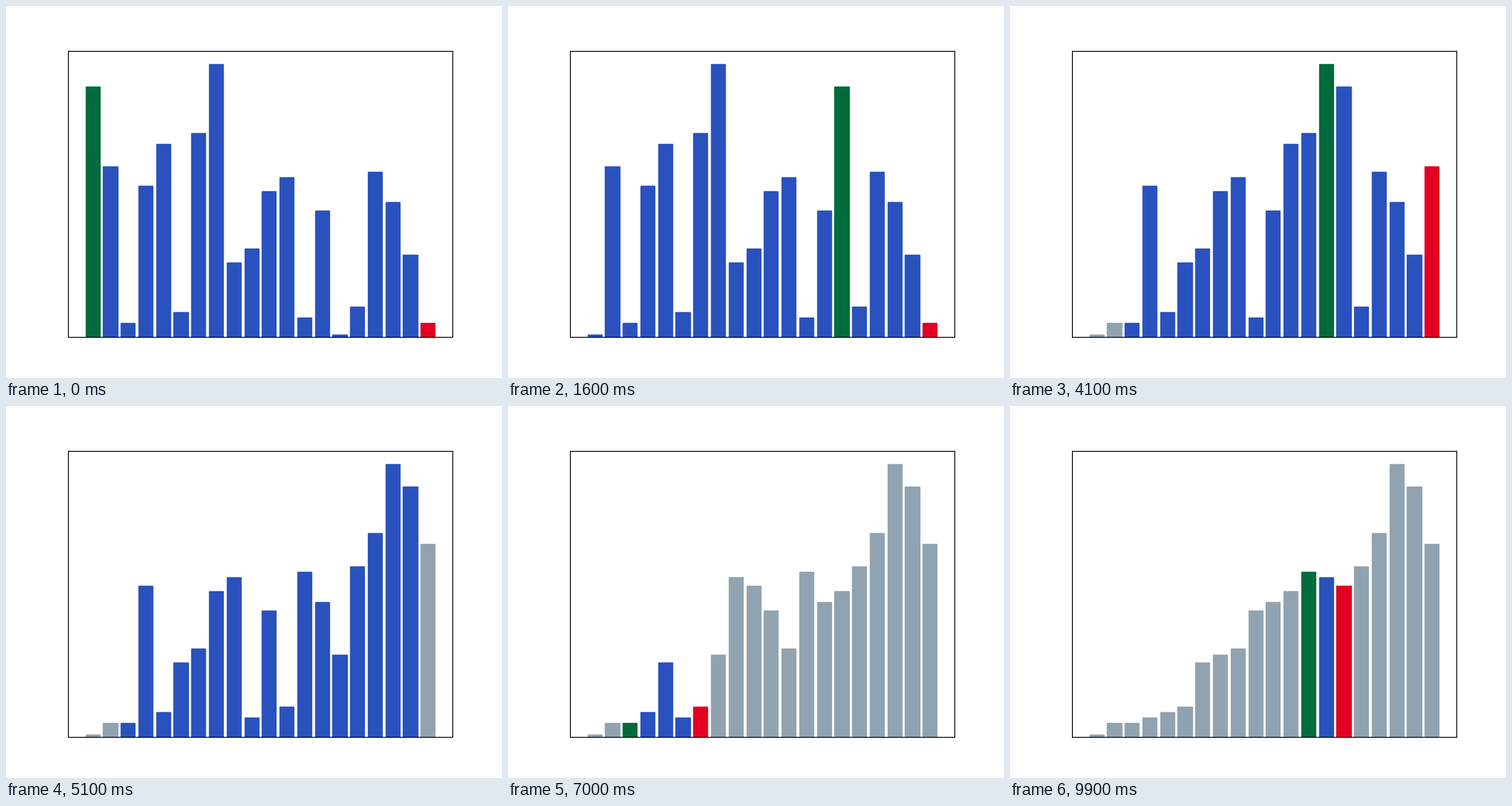
A matplotlib script that plays this animation: 640 by 480 pixels, repeating every 10000 ms.

```python
from itertools import islice

import matplotlib.pyplot as plt
from matplotlib.animation import FuncAnimation

VALUES = [91, 62, 5, 55, 70, 9, 74, 99, 27, 32,
          53, 58, 7, 46, 1, 11, 60, 49, 30, 5]
FRAMES = 100
INTERVAL = 100

IDLE = "#91a3b0"
ACTIVE = "#2a52be"
CURSOR = "#006b3c"
PIVOT = "#e30022"


def snapshot(a, lo, hi, cursor=None):
    """Heights and colours; without a cursor the pivot is not marked either."""
    colors = [ACTIVE if lo <= k < hi else IDLE for k in range(len(a))]
    if cursor is not None:
        colors[hi] = PIVOT
        colors[cursor] = CURSOR
    return list(a), colors


def quicksort(a, lo, hi):
    """Sort in place, yielding a snapshot after every step."""
    if lo >= hi:
        return
    yield snapshot(a, lo, hi, lo)
    split = lo
    for j in range(lo, hi):
        yield snapshot(a, lo, hi, j)
        if a[j] < a[hi]:
            if split != j:
                a[split], a[j] = a[j], a[split]
                yield snapshot(a, lo, hi, j)
            split += 1
    a[split], a[hi] = a[hi], a[split]
    yield snapshot(a, lo, hi)
    yield from quicksort(a, lo, split - 1)
    yield from quicksort(a, split + 1, hi)


steps = list(islice(quicksort(list(VALUES), 0, len(VALUES) - 1), FRAMES))

fig, ax = plt.subplots(figsize=(6.4, 4.8), dpi=100)
bars = ax.bar(range(len(VALUES)), VALUES)
ax.set_xticks([])
ax.set_yticks([])


def update(frame):
    for bar, height, color in zip(bars, *steps[frame]):
        bar.set_height(height)
        bar.set_color(color)
    return bars


anim = FuncAnimation(fig, update, frames=FRAMES, interval=INTERVAL, repeat=True)
plt.show()
```
